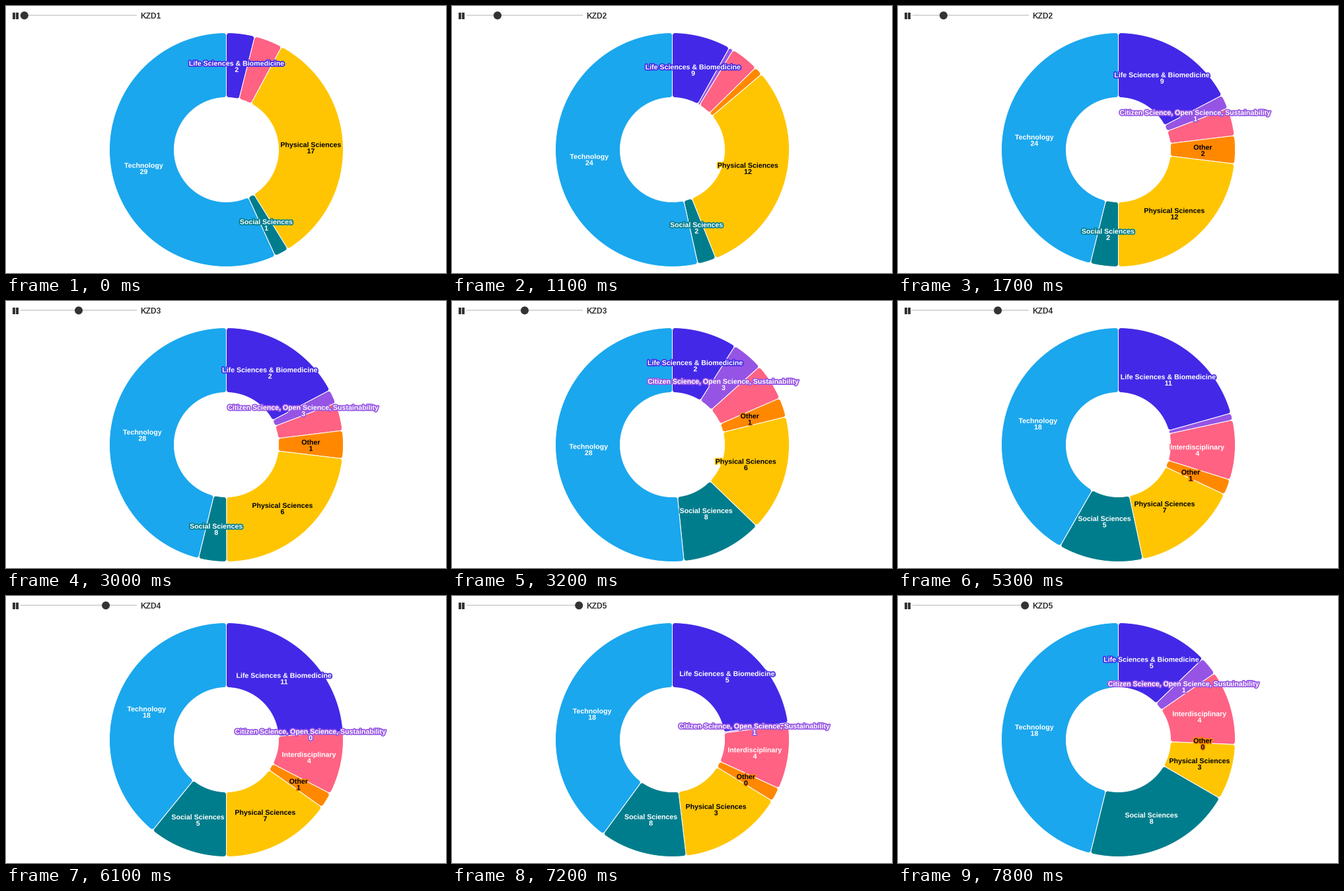
A matplotlib script that plays this animation: 666 px wide and 404 px high, repeating every 8200 ms.

```python
import numpy as np
import matplotlib.pyplot as plt
from matplotlib.animation import FuncAnimation
from matplotlib.patches import Circle, Polygon, Rectangle
from matplotlib.patheffects import withStroke

W, H, DPI = 666, 404, 100
PX = 72 / DPI  # one pixel in points
STEP, FRAMES = 100, 82

CX, CY = 333.5, 217.5
R_OUT, R_IN, CORNER = 177, 79, 4
R_LABEL = (R_OUT + R_IN) / 2

DARK = "#333333"
SLICES = [
    ("Life Sciences & Biomedicine", "#4328e7", "white"),
    ("Citizen Science, Open Science, Sustainability", "#9654e5", "white"),
    ("Interdisciplinary", "#ff6283", "white"),
    ("Other", "#ff8800", "black"),
    ("Physical Sciences", "#ffc502", "black"),
    ("Social Sciences", "#007d8c", "white"),
    ("Technology", "#1aa7ee", "white"),
]
VALUES = np.array([
    [2, 0, 2, 0, 17, 1, 29],
    [9, 1, 2, 2, 12, 2, 24],
    [2, 3, 3, 1, 6, 8, 28],
    [11, 0, 4, 1, 7, 5, 18],
    [5, 1, 4, 0, 3, 8, 18],
])
# labels dropped because they would overlap an earlier one
HIDDEN = [{1, 2, 3}, {2}, {1}, set(), set()]
STARTS = [916, 2966, 5018, 7069]
DURATION = 430

EDGES = np.array([np.r_[0, np.cumsum(v)] / v.sum() * 2 * np.pi for v in VALUES])
MIDS = (EDGES[:, 1:] + EDGES[:, :-1]) / 2
LABELS = np.stack([CX + R_LABEL * np.sin(MIDS), CY - R_LABEL * np.cos(MIDS)], axis=-1)


def ease(t):
    """Cubic in-out."""
    t = min(max(t, 0), 1)
    return 4 * t**3 if t < 0.5 else 1 - (2 - 2 * t) ** 3 / 2


def arc(center, radius, a0, a1, n):
    """Points on a circle, angles clockwise from the top."""
    a = np.linspace(a0, a1, n)
    return np.c_[center[0] + radius * np.sin(a), center[1] - radius * np.cos(a)]


def polar(radius, a):
    return CX + radius * np.sin(a), CY - radius * np.cos(a)


def ring_slice(a0, a1):
    """Outline of a ring sector with rounded corners."""
    s = np.sin(min(a1 - a0, np.pi) / 2)
    co = min(CORNER, R_OUT * s / (1 + s))
    ci = min(CORNER, R_IN * s / max(1 - s, 1e-6))
    oo = np.arcsin(co / (R_OUT - co))
    oi = np.arcsin(ci / (R_IN + ci))
    q = np.pi / 2
    n = 12 + int(60 * (a1 - a0))
    return np.vstack([
        arc(polar(R_OUT - co, a0 + oo), co, a0 - q, a0 + oo, 8),
        arc((CX, CY), R_OUT, a0 + oo, a1 - oo, n),
        arc(polar(R_OUT - co, a1 - oo), co, a1 - oo, a1 + q, 8),
        arc(polar(R_IN + ci, a1 - oi), ci, a1 + q, a1 - oi + 2 * q, 8),
        arc((CX, CY), R_IN, a1 - oi, a0 + oi, n),
        arc(polar(R_IN + ci, a0 + oi), ci, a0 + oi + 2 * q, a0 + 3 * q, 8),
    ])


fig = plt.figure(figsize=(W / DPI, H / DPI), dpi=DPI, facecolor="white")
ax = fig.add_axes([0, 0, 1, 1])
ax.set_xlim(0, W)
ax.set_ylim(H, 0)
ax.axis("off")


def add_text(text, size, color, **kw):
    return ax.text(0, 0, text, family="Liberation Sans", weight="bold",
                   size=size * PX, color=color, va="baseline", **kw)


# player controls
for x in (10, 15):
    ax.add_patch(Rectangle((x, 9.5), 3.5, 10, fc=DARK, lw=0))
ax.add_patch(Rectangle((22, 13), 176, 2, fc="#d8d8d8", lw=0))
knob = ax.add_patch(Circle((28, 14.3), 6, fc=DARK, lw=0, zorder=3))
title = add_text("", 12, DARK, ha="left")
title.set_position((203.5, 18.7))

wedges, names, counts = [], [], []
for name, color, ink in SLICES:
    wedges.append(ax.add_patch(Polygon([(0, 0), (1, 0), (0, 1)], fc=color,
                                       ec="white", lw=PX, zorder=2)))
    halo = [withStroke(linewidth=3.4 * PX, foreground=color)]
    names.append(add_text(name, 10.6, ink, ha="center", zorder=5, path_effects=halo))
    counts.append(add_text("", 10.6, ink, ha="center", zorder=5, path_effects=halo))


def update(i):
    t = i * STEP
    k = sum(t >= s for s in STARTS)
    prev = max(k - 1, 0)
    u = (t - STARTS[k - 1]) / DURATION if k else 1
    p = ease(u)
    edges = EDGES[prev] + (EDGES[k] - EDGES[prev]) * p
    spots = LABELS[prev] + (LABELS[k] - LABELS[prev]) * p
    hidden = HIDDEN[k if u >= 1 else prev]

    knob.center = (27.8 + 41.1 * k, 14.3)
    title.set_text(f"KZD{k + 1}")
    for j, (x, y) in enumerate(spots):
        a0, a1 = edges[j], edges[j + 1]
        wedges[j].set_visible(a1 - a0 > 1e-3)
        if a1 - a0 > 1e-3:
            wedges[j].set_xy(ring_slice(a0, a1))
        names[j].set_position((x, y - 0.1))
        counts[j].set_position((x, y + 9.4))
        counts[j].set_text(str(VALUES[k][j]))
        for label in (names[j], counts[j]):
            label.set_visible(j not in hidden)
    return [knob, title, *wedges, *names, *counts]


anim = FuncAnimation(fig, update, frames=FRAMES, interval=STEP,
                     repeat=True, repeat_delay=0)
plt.show()
```
